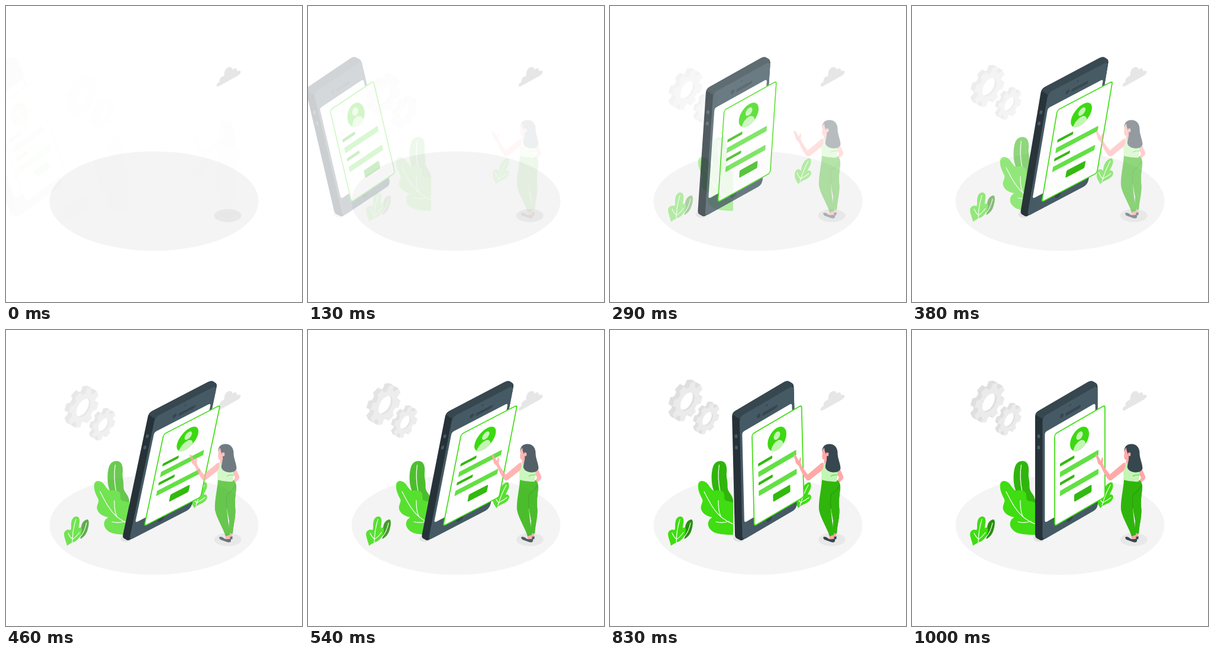
Recreate the animation shown at these times as an HTML page. Size 500 px wide and 500 px high, loop 1040 ms.

```html
<!DOCTYPE html>
<html lang="en">
<head>
<meta charset="utf-8">
<title>Sign-up illustration</title>
<style>
  html, body { margin: 0; width: 100%; height: 100%; overflow: hidden; background: #fff; }
  svg { display: block; width: 100vw; height: 100vh; }
  .leaf { fill: #3fdd12; }
  .leaf-dark { fill: #30b50d; }
  .vein { fill: none; stroke: #fff; stroke-width: 1.2; stroke-linecap: round; }
  .skin { fill: #ffa9a7; }
  .dark { fill: #37474f; }
  .slate { fill: #455a64; }
  .label { fill: #32b90f; }
  .field { fill: #62e044; }
  .pale { fill: #c4f5b5; }
</style>
</head>
<body>
<svg viewBox="0 0 500 500" xmlns="http://www.w3.org/2000/svg">
  <defs>
    <clipPath id="plantEdge"><rect x="140" y="210" width="68" height="140"/></clipPath>
    <clipPath id="avatar"><circle cx="48.5" cy="32.2" r="18.5"/></clipPath>
  </defs>

  <ellipse cx="250" cy="329.5" rx="176.5" ry="84" fill="#f4f4f4"/>
  <ellipse cx="374.7" cy="354" rx="23" ry="11" fill="#e8e8e8"/>
  <path fill="#e6e6e6" d="M355.5 134.5C356 131 358 129 360.500 129C360 124 362 119.500 368.500 118C368.500 110 371 104 377 103.200C381 102.700 383 105 382.800 108C385 104.500 390 103.500 390.500 110C393 108.500 396 109 396.500 111C396.500 114 394 116 391 118L361 134.800C358.500 136.200 356 136.800 355.500 134.500Z"/>

  <g id="gears"></g>

  <g class="fade" clip-path="url(#plantEdge)">
    <path class="leaf-dark" d="M176 273C171 262 170 244 174 231C177 223 183 220.500 189 221.500C196 223 198 231 197 241C196 250 199 254 198.500 263C198 272 203 275 206 281L210 292V310H190Z"/>
    <path class="vein" d="M184.500 228C182 243 183 258 186 273"/>
    <path class="leaf" d="M149 261C150 254 157 253 163 258C168 262 170 270 176 271.500C182 270 190 270 192.500 276C194 281 192 286 196 288.500C202 289.500 206 290 210 294V346C194 346 180 345 173 340C166 335 164 328 167 322C168 319 172 318 172 316C164 315 156 310 154 303C152 296 158 291 156 286C152 278 148 271 149 261Z"/>
    <path class="vein" d="M159 273C167 289 177 309 192 319Q200 325 209 328M183 288Q183 309 188 316M179 324Q190 327 201 323"/>
  </g>

  <g class="fade">
    <path fill="#27900c" d="M126 353C124 346 127 340 127 333C128 325 133 320 138 320C141 322 140 330 138 337C136 345 131 350 126 353Z"/>
    <path class="vein" d="M136 326Q133 341 125 350"/>
    <path class="leaf" d="M103 364.500C102 358 98 351 98 344C99 338 105 336 109 338C111 334 109 329 111 322C113 315 120 313 123 317C126 322 123 329 123 335C126 332 129 334 128 340C127 347 123 353 117 357C112 359 107 361 103 364.500Z"/>
    <path class="vein" d="M118 320Q112 340 112 359M105 343Q108 350 112 353M124 342Q118 350 113 353"/>
  </g>

  <g class="fade">
    <path class="leaf" d="M318 301C316 296 312 293 312 286C312 279 315 275 319 276C321 276 322 278 323 278C323 270 327 261 334 258C338 256 340 259 339.500 264C339 270 335 274 334 278C338 277 341 280 339.500 284C338 290 331 293 326 295Q321 297 318 301Z"/>
    <path class="vein" d="M335 262Q326 278 321 296M316 281Q318 289 323 292M336 283Q330 288 323 291"/>
  </g>

  <g id="phone">
    <ellipse cx="215" cy="352" rx="10" ry="5.500" fill="#e2e2e2"/>
    <path fill="#263238" d="M208 147Q208 140 213 137L297 88Q302 85 306 87L311 90Q313.500 92 313.500 97V295L222 354Q218 356.500 215 354L211 352Q208 350 208 346Z"/>
    <path class="dark" d="M208.500 143Q209.500 139.500 213 137L297 88Q302 85 306 87L311 90Q313 91.500 313 95L226 148L220.500 150Z"/>
    <g transform="matrix(.866 -.5 0 1 220.500 147)">
      <rect class="slate" width="107.400" height="208.500" rx="7"/>
      <rect x="4.500" y="28" width="98.500" height="153" rx="4" fill="#fff"/>
      <g class="dark">
        <circle cx="37.500" cy="16.800" r="3.600"/>
        <rect x="44.500" y="16" width="30" height="5" rx="2.500"/>
        <circle cx="54" cy="7" r="1.600"/>
        <circle cx="53" cy="197" r="6"/>
      </g>
    </g>
    <g class="slate">
      <ellipse cx="214" cy="179.500" rx="2.400" ry="3.300"/>
      <ellipse cx="214" cy="198.500" rx="2.400" ry="3.300"/>
    </g>
    <g transform="matrix(.866 -.5 0 1 241 176)">
      <rect width="98" height="155" rx="4" fill="#fff" stroke="#3fdd12" stroke-width="2"/>
      <circle cx="48.500" cy="32.200" r="18.500" fill="#3cd911"/>
      <g class="pale" clip-path="url(#avatar)">
        <circle cx="48.500" cy="26.700" r="6.400"/>
        <circle cx="48.500" cy="47.500" r="12"/>
      </g>
      <rect class="label" x="10.400" y="55" width="28" height="5" rx="1"/>
      <rect class="field" x="10.400" y="69" width="75" height="9" rx="1"/>
      <rect class="label" x="10.400" y="87" width="28" height="5" rx="1"/>
      <rect class="field" x="10.400" y="101" width="75" height="9" rx="1"/>
      <rect class="label" x="38" y="121" width="34" height="12.500" rx="2"/>
    </g>
  </g>

  <g class="fade">
    <path class="skin" d="M382 233Q387 232 389 236L394 247Q395 251 391 254L386 259L383 257L387 249L382 242Z"/>
    <path class="skin" d="M370 345L377 344L379 353L371 353Z M377 342L382 341V350L378 350Z"/>
    <path class="dark" d="M360 350C363 348 366 350 370 353Q376 354 380 352V357Q378 360 373 358L362 354Q360 352 360 350Z M378 349Q380 350 382.500 348V353L379 354Z"/>
    <path fill="#2aa00a" d="M370 262L388 258C390 270 386 283 387 297C389 312 384 327 383 344L376 342.500L377 322Q374 308 372 292Z"/>
    <path class="leaf-dark" d="M358 252L385 254Q390 260 389 269C387 282 386 291 387.500 304C388 317 384 329 383 344L376.500 342.500L377 322Q375 310 373 298Q374 318 378.500 346L371 348.500C367 335 356 319 353 304C352 287 357 271 358 252Z"/>
    <path d="M387 262Q382 274 374 277Q371 288 373.500 301" fill="none" stroke="#289b0a" stroke-width="1.200"/>
    <path class="skin" d="M362 217L373 216V227L361 229Z"/>
    <path class="pale" d="M360 224Q368 229 376 222L384 236Q385 246 383 256Q370 257 357 253Q358 243 356 236Z"/>
    <path d="M373 247Q378 244 384 245" fill="none" stroke="#45d820" stroke-width="1.200"/>
    <path class="skin" d="M360 224Q362 232 357 238L338 253Q334 256 331 252Q324 243 319 230L314 225Q313 219 310 212Q311 209 314 212L319 221L321 215Q324 215 322 224L324 230L334 244L353 228Q357 224 360 224Z"/>
    <path class="skin" d="M360 199C357 205 360 207 358 213L359 218Q363 221 368 217L371 204Z"/>
    <path class="dark" d="M358.500 204C359 196 364 192.500 371 192.500C380 193 384 199 384.500 207C384 216 389 224 389.500 234Q387 241 377 240.500Q367 240 364 233C363 227 367 222 366 213L364 208Q362 202 362 199Q359 201 358.500 206Z"/>
    <ellipse class="skin" cx="367" cy="210" rx="2.400" ry="3.200"/>
  </g>
</svg>
<script>
const LOOP = 1040;
const FRAME = 1000 / 24;
const PIVOT_Y = 221;
// [start ms, skew degrees, x shift, opacity]
const PHONE_STEPS = [[0, 20, -250, 0], [600, -10, 0, 1], [800, 2, 0, 1], [1000, 0, 0, 1]];

const gears = document.getElementById("gears");
const phone = document.getElementById("phone");
const fades = document.querySelectorAll(".fade");

const polar = (r, deg) => {
  const a = deg * Math.PI / 180;
  return (r * Math.cos(a)).toFixed(2) + " " + (r * Math.sin(a)).toFixed(2);
};

function gearPath(outer, inner) {
  const points = [];
  for (let i = 0; i < 8; i++) {
    const mid = 22.5 + i * 45;
    points.push(polar(inner, mid - 15), polar(outer, mid - 10),
                polar(outer, mid + 10), polar(inner, mid + 15));
  }
  return "M" + points.join("L") + "Z";
}

function gear(x, y, outer, hole, depth) {
  const d = gearPath(outer, outer * 0.77);
  const place = back => `transform="matrix(.866 -.5 0 1 ${x - back} ${y - back * 0.577})"`;
  let svg = "";
  for (let back = depth; back > 0; back -= 0.5) {
    svg += `<path d="${d}" fill="#dfdfdf" ${place(back)}/>`;
  }
  const id = "hole" + x;
  return svg + `<path d="${d}" fill="#ebebeb" ${place(0)}/>
    <clipPath id="${id}"><circle r="${hole}" ${place(0)}/></clipPath>
    <g clip-path="url(#${id})">
      <circle r="${hole}" fill="#dfdfdf" ${place(0)}/>
      <circle r="${hole}" fill="#fff" ${place(depth * 0.45)}/>
    </g>`;
}

gears.innerHTML = gear(131, 123, 30, 14, 7) + gear(165, 152, 23.5, 10.5, 5);

// cubic-bezier(.36, -.01, .5, 1.38)
function ease(x) {
  if (x <= 0) return 0;
  if (x >= 1) return 1;
  const curve = (a, b, s) => 3 * a * s * (1 - s) ** 2 + 3 * b * s * s * (1 - s) + s ** 3;
  let low = 0, high = 1;
  for (let i = 0; i < 30; i++) {
    const mid = (low + high) / 2;
    if (curve(0.36, 0.5, mid) < x) low = mid; else high = mid;
  }
  return curve(-0.01, 1.38, low);
}

const clamp = v => Math.max(0, Math.min(1, v));

function phonePose(time) {
  const last = PHONE_STEPS.length - 2;
  let i = 0;
  while (i < last && time >= PHONE_STEPS[i + 1][0]) i++;
  const from = PHONE_STEPS[i], to = PHONE_STEPS[i + 1];
  const p = ease((time - from[0]) / (to[0] - from[0]));
  return from.map((v, n) => v + (to[n] - v) * p);
}

// 24 pictures a second on a 10 ms grid; the first is held for two
function clock(t) {
  const k = Math.floor((Math.floor(t / 10) * 10 + 4.9) / FRAME);
  return k < 2 ? 38 : Math.min(1000, k * FRAME + 25);
}

function draw(t) {
  const time = clock(t);
  const p = ease(time / 1000);
  fades.forEach(el => el.setAttribute("opacity", clamp(p)));
  gears.setAttribute("opacity", clamp(p));
  gears.setAttribute("transform", `translate(0 ${30 * (1 - p)})`);

  const [, skew, shift, alpha] = phonePose(time);
  phone.setAttribute("opacity", clamp(alpha));
  phone.setAttribute("transform",
    `translate(${shift} ${PIVOT_Y}) skewX(${skew}) translate(0 ${-PIVOT_Y})`);
}

const start = performance.now();
function tick() {
  draw((performance.now() - start) % LOOP);
  requestAnimationFrame(tick);
}
tick();
</script>
</body>
</html>
```
